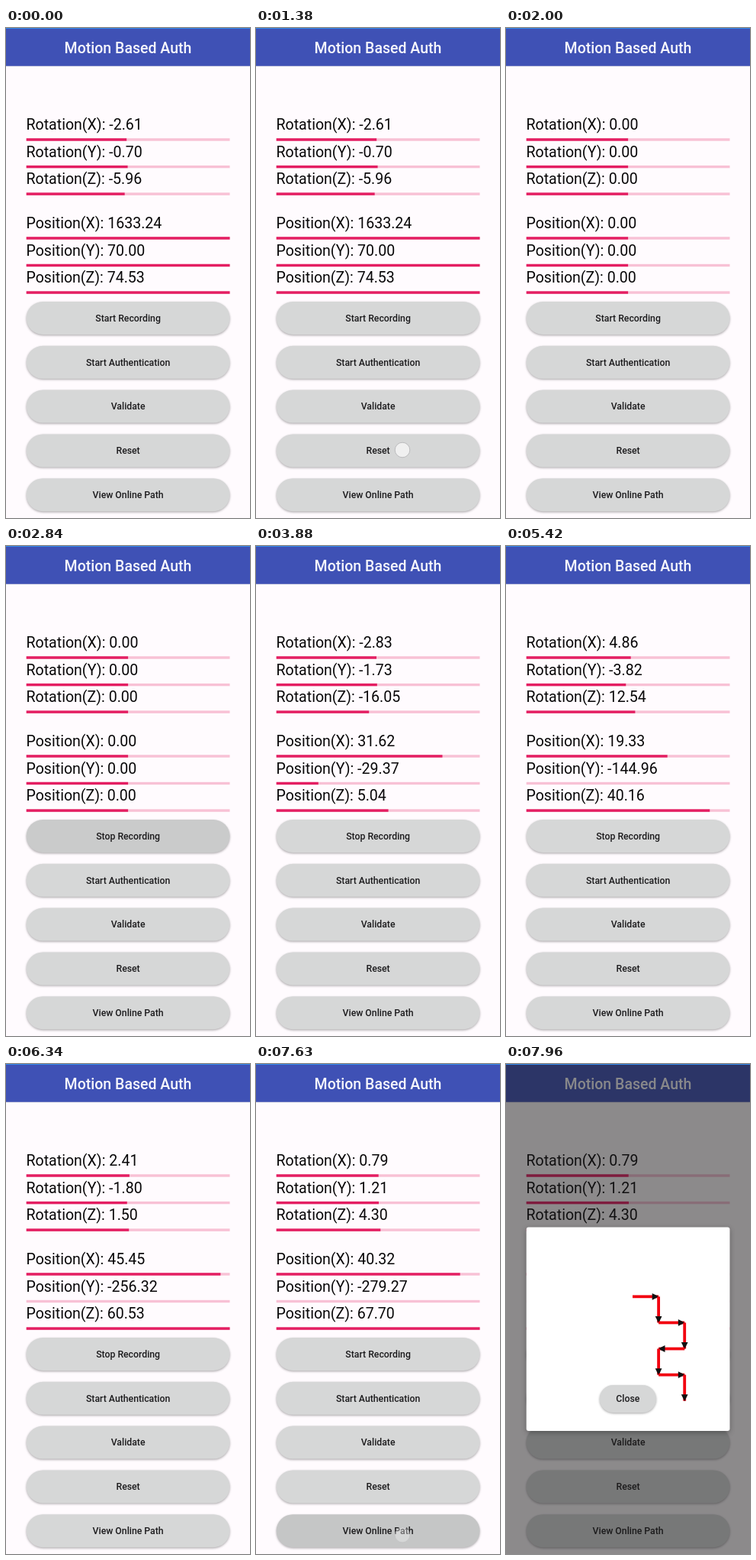
Recreate the animation shown at these times as an HTML page with a canvas. Size 320 by 641 pixels, loop 8000 ms.

```html
<!DOCTYPE html>
<html lang="en">
<head>
<meta charset="utf-8">
<title>Motion Based Auth</title>
<style>
html, body { margin: 0; width: 100%; height: 100%; overflow: hidden; background: #fffbfe; }
canvas { display: block; width: 320px; height: 641px; }
</style>
</head>
<body>
<canvas id="stage"></canvas>
<script>
const W = 320, H = 641, LOOP = 8000;
const canvas = document.getElementById('stage');
const ctx = canvas.getContext('2d');
const ratio = window.devicePixelRatio || 1;
canvas.width = Math.round(W * ratio);
canvas.height = Math.round(H * ratio);

const FONT = 'Roboto, "Open Sans", sans-serif';
const LEFT = 26.7, RIGHT = 293.5, WIDE = RIGHT - LEFT;
const HOLD = 130, UPDATE = 40;

// Button index and time of each tap
const taps = [
  { button: 3, at: 1340 },
  { button: 0, at: 2640 },
  { button: 0, at: 6640 },
  { button: 4, at: 7490 }
];
const [RESET, START, STOP, CHOSEN] = taps.map(tap => tap.at + HOLD);
const DIALOG = CHOSEN + 100;

// Readings start at zero, then pass through "points" at the times in "marks",
// swaying "turns" half waves between them
const marks = [2900, 4500, 5420, STOP - 20];
const sensors = [
  { name: 'Rotation(X)', before: -2.61, points: [0, -1.65, 4.86, .79], sway: 3, turns: 3 },
  { name: 'Rotation(Y)', before: -.7, points: [0, -.86, -3.82, 1.21], sway: 2, turns: 2 },
  { name: 'Rotation(Z)', before: -5.96, points: [0, -20.24, 12.54, 4.3], sway: 5, turns: 2 },
  { name: 'Position(X)', before: 1633.24, points: [0, 31.19, 19.33, 40.32], sway: 12, turns: 1 },
  { name: 'Position(Y)', before: 70, points: [0, -38.06, -144.96, -279.27], sway: 8, turns: 2 },
  { name: 'Position(Z)', before: 74.53, points: [0, 8.69, 40.16, 67.7], sway: 1, turns: 2 }
];

const clamp = v => Math.max(0, Math.min(1, v));
const ramp = (t, from, length) => clamp((t - from) / length);

function reading({ before, points, sway, turns }, t) {
  if (t < RESET) return before;
  const tick = Math.floor((t - UPDATE / 2) / UPDATE) * UPDATE + UPDATE / 2;
  let value = points[0];
  for (let i = 1; i < marks.length; i++) {
    const u = ramp(tick, marks[i - 1], marks[i] - marks[i - 1]);
    const ease = u * u * (3 - 2 * u);
    value += (points[i] - points[i - 1]) * ease + sway * Math.sin(Math.PI * turns * u);
  }
  return value;
}

function text(str, x, y, size, weight, color, align) {
  ctx.font = `${weight} ${size}px ${FONT}`;
  ctx.fillStyle = color;
  ctx.textAlign = align;
  ctx.fillText(str, x, y);
}

function box(x, y, w, h, r, color, blur, drop, shade) {
  ctx.save();
  ctx.shadowColor = `rgba(0,0,0,${shade})`;
  ctx.shadowBlur = blur * ratio;
  ctx.shadowOffsetY = drop * ratio;
  ctx.fillStyle = color;
  ctx.beginPath();
  ctx.roundRect(x, y, w, h, r);
  ctx.fill();
  ctx.restore();
}

function pill(label, x, y, w, h, color) {
  box(x, y, w, h, h / 2, color, 3, 1.2, .32);
  text(label, x + w / 2, y + h / 2 + 4.3, 12.25, 500, '#1c1b1d', 'center');
}

function sensorRow(sensor, index, t) {
  const turning = index < 3;
  const base = 133 + index * 35.55 + (turning ? 0 : 22.3);
  const value = reading(sensor, t);
  const label = value.toFixed(2).replace(/^-0\.00$/, '0.00');
  text(`${sensor.name}: ${label}`, 26.5, base, 19.57, 400, '#080708', 'left');
  const part = clamp(.5 + value / (turning ? 360 : 100));
  ctx.fillStyle = '#f8c1d5';
  ctx.fillRect(LEFT, base + 11.3, WIDE, 3.4);
  ctx.fillStyle = '#e41e62';
  ctx.fillRect(LEFT, base + 11.3, WIDE * part, 3.4);
}

function pressed(index, t) {
  const levels = taps.filter(tap => tap.button === index)
    .map(({ at }) => ramp(t, at + 50, 60) * (1 - ramp(t, at + 160, 140)));
  return Math.max(0, ...levels);
}

function button(label, index, t) {
  const g = Math.round(215 - 17 * pressed(index, t));
  pill(label, LEFT, 358 + index * 57.8, WIDE, 43, `rgb(${g - 1},${g},${g})`);
}

function finger({ button, at }, t) {
  const alpha = ramp(t, at, 30) * (1 - ramp(t, at + 110, 55));
  if (alpha <= 0) return;
  ctx.save();
  ctx.globalAlpha = alpha;
  ctx.beginPath();
  ctx.arc(192, 384 + button * 58 - (button === 3 ? 6 : 0), 9.8, 0, 7);
  ctx.fillStyle = 'rgba(244,244,244,.85)';
  ctx.fill();
  ctx.lineWidth = 1;
  ctx.strokeStyle = '#bcbcbe';
  ctx.stroke();
  ctx.restore();
}

function pathArrows() {
  const step = 34.1;
  let x = 166, y = 304.3;
  for (const dir of 'RDRDLDRD') {
    const dx = dir === 'R' ? 1 : dir === 'L' ? -1 : 0;
    const dy = dir === 'D' ? 1 : 0;
    ctx.save();
    ctx.translate(x, y);
    ctx.rotate(Math.atan2(dy, dx));
    ctx.fillStyle = '#f2000f';
    ctx.fillRect(0, -1.9, step, 3.8);
    ctx.fillStyle = '#111';
    ctx.beginPath();
    ctx.moveTo(step + .6, 0);
    ctx.lineTo(step - 8.4, -4.4);
    ctx.lineTo(step - 8.4, 4.4);
    ctx.fill();
    ctx.restore();
    x += dx * step;
    y += dy * step;
  }
}

function dialog(t) {
  const dim = ramp(t, DIALOG, 200);
  if (dim <= 0) return;
  ctx.fillStyle = `rgba(26,26,26,${.5 * dim})`;
  ctx.fillRect(0, 0, W, H);
  const show = 1 - (1 - ramp(t, DIALOG, 160)) ** 2;
  const scale = .9 + .1 * show;
  ctx.save();
  ctx.globalAlpha = show;
  ctx.translate(160, 346.8);
  ctx.scale(scale, scale);
  ctx.translate(-160, -346.8);
  box(LEFT, 213.6, WIDE, 266.4, 3, '#fff', 7, 2, .3);
  pathArrows();
  pill('Close', 122.7, 420, 74.3, 36, '#d6d7d7');
  ctx.restore();
}

function draw(t) {
  ctx.setTransform(ratio, 0, 0, ratio, 0, 0);
  ctx.fillStyle = '#fffbfe';
  ctx.fillRect(0, 0, W, H);
  box(0, 0, W, 49.8, 0, '#3f51b5', 2, .5, .12);
  text('Motion Based Auth', 160, 33, 19.5, 500, '#f7f7fc', 'center');
  sensors.forEach((sensor, i) => sensorRow(sensor, i, t));
  const record = t >= START && t < STOP ? 'Stop Recording' : 'Start Recording';
  [record, 'Start Authentication', 'Validate', 'Reset', 'View Online Path']
    .forEach((label, i) => button(label, i, t));
  taps.forEach(tap => finger(tap, t));
  dialog(t);
  ctx.fillStyle = '#348ae8';
  ctx.fillRect(0, 0, W, 1);
}

const origin = performance.now();
function frame() {
  draw((performance.now() - origin) % LOOP);
  requestAnimationFrame(frame);
}
frame();
</script>
</body>
</html>
```
